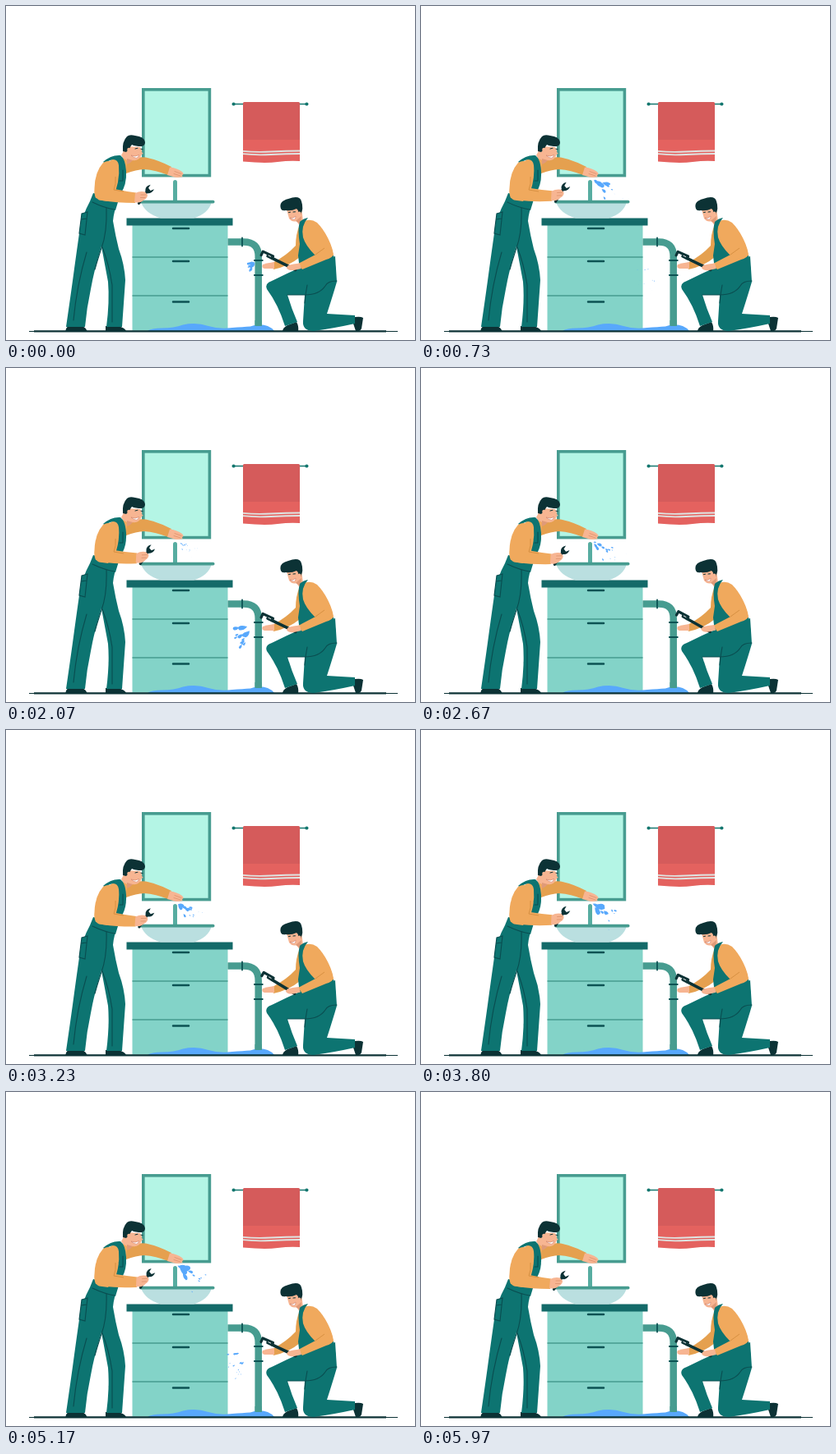
These frames come from a looping animation (497 px wide and 407 px high, 6.01 s). An HTML page:

```html
<!DOCTYPE html>
<html lang="en">
<head>
<meta charset="utf-8">
<title>Plumbers at work</title>
<style>
  html, body { margin: 0; width: 100%; height: 100%; overflow: hidden; background: #fff; }
  svg { display: block; width: 497px; height: 407px; }
  .suit { fill: #0d7471; }
  .shirt { fill: #f0a95d; }
  .shade { fill: #e5a04f; }
  .skin { fill: #f7b592; }
  .dark { fill: #0c3235; }
  .steel { fill: #479c90; }
  .water { fill: #58a8fc; }
  .seam { fill: none; stroke: #0a4d50; stroke-width: 1.1; stroke-linecap: round; }
  .ink { fill: none; stroke: #0c3235; stroke-linecap: round; stroke-linejoin: round; }
  .fold { fill: none; stroke: #d08a3c; stroke-width: .8; }
  .finger { fill: none; stroke: #d88c66; stroke-width: .7; stroke-linecap: round; }
  .smile { fill: #fff; stroke: #b85f4c; stroke-width: .4; }
</style>
</head>
<body>
<svg viewBox="0 0 497 407">
  <!-- mirror and towel -->
  <rect x="166.800" y="101.800" width="80.600" height="104.800" fill="#b4f5e5" stroke="#479c90" stroke-width="3.600"/>
  <path d="M277 119.500H365" stroke="#14776f" stroke-width="1.700"/>
  <g fill="#14776f"><circle cx="276.600" cy="119.500" r="2.100"/><circle cx="365.400" cy="119.500" r="2.100"/></g>
  <path d="M288 118.500Q288 117 289.500 117H355.500Q357 117 357 118.500V163H288Z" fill="#d55b5b"/>
  <path d="M288 163H357V189Q345 188 330 190T288 189.500Z" fill="#e4625f"/>
  <g fill="none" stroke="#dfe5e3" stroke-width="1.800">
    <path d="M288 176.800Q303 178.500 322 177.500T357 176.500"/><path d="M288 180.200Q303 182 322 181T357 180"/>
  </g>

  <!-- vanity -->
  <rect x="153.500" y="267" width="116" height="128.500" fill="#83d3c8"/>
  <path d="M153.500 306H269.500M153.500 353H269.500" stroke="#479c90" stroke-width="1.600"/>
  <path d="M203 271H222M203 311H222M203 360.500H222" class="ink" style="stroke:#0c5253" stroke-width="2.500"/>
  <rect x="146.500" y="258.500" width="129" height="9" fill="#146a69"/>
  <path d="M205.500 214.500V239" stroke="#57ada1" stroke-width="5" stroke-linecap="round"/>
  <path d="M164 239H250Q246 253 228 258.500H188Q169 253 164 239Z" fill="#badfe0"/>
  <rect x="162" y="236.800" width="91.500" height="3.700" rx="1.800" class="steel"/>

  <!-- pipe, puddle, floor -->
  <path d="M269.500 287.500H289Q306.700 287.500 306.700 305V391" fill="none" stroke="#479c90" stroke-width="8.500"/>
  <path d="M287 282.500V292.500M301.800 310H311.800M301.800 328H311.800" class="ink" style="stroke:#0c5253" stroke-width="1.800"/>
  <path class="water" d="M172 396Q176 392.500 190 392.500Q204 392.500 215 388.500Q231 385 246 390Q259 394 275 392Q288 391 297 390.500Q308 386.500 318 390Q323 392 326 396Z"/>
  <rect x="302.500" y="383" width="8.500" height="7" class="steel"/>
  <path d="M28 396H476V397H462V397.600H34V397H28ZM34 395.200H462V397H34Z" class="dark"/>

  <path id="tapWater" class="water"/>

  <!-- standing plumber -->
  <path class="shade" d="M146 189Q156 183 170 184.500Q186 188 201 196L197 206Q182 200 168 199Q158 199.500 146 204Z"/>
  <path class="skin" d="M199 196.500Q207 197 214 202Q217 205 214 206L214.500 208Q208 210 203 208L196 206Z"/>
  <path class="finger" d="M205 201.500L213 204.500M204 204.500L212 207"/>
  <path class="skin" d="M140 182L146 171L163 172Q167 178 164 183Q161 189 154 188L147 192Z"/>
  <path d="M147 186L154 188Q151 192 147 193Z" fill="#e09a78"/>
  <path class="dark" d="M142 177Q141 165 147 159Q150 156 157 158Q168 159 169 166Q169 170 165 171Q157 171 153 169Q151 171 150 174L146 178Z"/>
  <circle cx="149.500" cy="175" r="2.300" class="skin"/>
  <path d="M157 174L160 173.200M164 174.200L166 174.500" class="ink" stroke-width="1"/>
  <path d="M163 177L167 180L163 181" class="skin"/>
  <path class="smile" d="M152 182Q157 184.500 161.500 181.500Q160 188.500 152 182Z"/>

  <path class="dark" d="M72.500 397Q72 392 77 389H91Q98 392 98.500 397ZM121 397V390H136Q145 392 146.500 397Z"/>
  <path class="suit" d="M106 228L137 234Q131 250 130 262Q133 280 137 296Q144 315 145 334L141 391H122Q126 360 124 336L116 293Q107 322 103 345Q98 368 96 391H73Q79 350 83 320Q86 298 89 277Q92 256 102 238Z"/>
  <path class="shirt" d="M138 183L147 188Q147 206 140 220L134 240L109 234Q106 228 112 205Q120 189 138 183Z"/>
  <path class="suit" d="M118 190Q128 181 139 182Q145 186 146 201Q147 218 139 229L133 249L104 239L108 234L129 236Q139 214 137 194Q136 187 130 187Q124 188 121 192Z"/>
  <path class="seam" d="M105 239Q119 246 132 248M122 246Q123 276 116 295Q111 310 108 321M117 294Q125 314 129 340V385M82 383Q86 340 98 300M142 200V213H138"/>
  <path class="suit" d="M92 253L99 251L96 279L89 277Z"/>
  <path class="seam" d="M92 253L99 251L96 279L89 277ZM91 260L98 259"/>

  <g id="foreArm">
    <g transform="translate(166.500 233) rotate(34)">
      <path d="M0 9V-9" class="ink" stroke-width="3.200"/>
      <path transform="translate(0 -9) rotate(18)" d="M-3.500 -8Q-6.500 -2 -1.800 1.500H1.800Q6.500 -2 3.500 -8L2 -3.500H-2Z" class="dark"/>
    </g>
    <path class="shirt" d="M110 225L132 223Q146 226 158 227.500L157 240Q134 240 117 237Q108 236 109 228Z"/>
    <path class="skin" d="M157 228Q163 225 169 226.500L172 230Q172 234 168 236Q163 241 156 239Z"/>
    <path class="finger" d="M164 230H170M163.500 233.500H169"/>
  </g>
  <path class="shirt" d="M118 191Q126 186 132 193Q137 203 133 224L124 238L113 236.500Q106 233 107.500 222Q108 202 118 191Z"/>
  <path class="fold" d="M133 208Q134 217 131 224L143 226"/>

  <!-- kneeling plumber -->
  <path class="shade" d="M357 266Q352 278 352 292Q341 304 324 313L325 321Q344 317 357 306L366 285Z"/>
  <path class="skin" d="M326 312Q318 313 312 315Q310 319 314 320L326 320Z"/>
  <path class="skin" d="M341 248L359 246L361 262L357 268L353 262Q348 264 344 259Z"/>
  <path d="M352 262L359 256L358 266Z" fill="#e09a78"/>
  <path class="dark" d="M334 247Q331 238 343 235Q357 230 359 238Q362 247 358 254L355 253Q356 249 353 247Q347 250 340 249Q335 250 334 247Z"/>
  <circle cx="356.500" cy="252.500" r="2.100" class="skin"/>
  <path d="M343.500 251.600L345.500 251.200M349 251L351.500 250.800" class="ink" stroke-width="1"/>
  <path class="smile" d="M345 258.200Q349 259.500 352 256Q352 263 345 258.200Z"/>

  <path class="dark" d="M336 397Q336 392 342 389L353 385Q356 390 355 397ZM424 379Q431 378 434 380L432 393Q430 397 425 396L422 387Z"/>
  <path class="suit" d="M359 318L400 305L402 336Q398 350 390 375L424 377V387Q397 393 374 396Q360 396 361 384L363 352H342Q347 369 354 385L339 390Q331 364 317 345Q314 338 323 335Q341 326 359 318Z"/>
  <path class="shirt" d="M358 265Q368 257 378 264Q393 279 398 305L361 320L357 290Z"/>
  <path class="suit" d="M357 263Q361 259 367 258Q358 268 361 282Q364 292 375 303L398 304L401 322L357 322L355 304L357 290Q354 272 357 263Z"/>
  <path class="seam" d="M363 352Q381 352 388 341Q391 335 402 335M363 352H342M366 340Q364 350 363 362"/>

  <path id="pipeWater" class="water"/>
  <g id="wrench">
    <path d="M318 305.500L352 321.500" class="ink" stroke-width="3.600"/>
    <path d="M310 304.500L312 300L324.500 305.500L323 308" class="ink" stroke-width="3.200"/>
    <path d="M318.500 304.600L322 306.200" stroke="#fff" stroke-width=".9"/>
  </g>
  <path class="shirt" d="M368 261Q378 263 388 278Q396 290 398 303Q396 307 389 309L360 321L355 314L376 303Q364 289 362 277Q362 266 368 261Z"/>
  <path class="fold" d="M376 303L387 295"/>
  <path id="grip" class="skin" d="M357 313.500Q349 314 343 316L341 319Q344 323 350 322L359 320Z"/>
</svg>

<script>
const LOOP = 6010;
const CYCLE = LOOP / 4;
const $ = id => document.getElementById(id);
const fract = v => v - Math.floor(v);
const noise = n => fract(Math.sin(n * 12.9898) * 43758.5453);
const wave = (p, peak) => (1 + Math.cos((p - peak) * Math.PI * 2)) / 2;

// A drop starts at (x, y) and flies up to `far` within `fan` radians of `aim`.
// `lag` staggers the drops, `laps` is how often each one flies per burst.
const tap = { el: $('tapWater'), x: 209, y: 212, aim: .66, fan: .5, far: 44, size: 8.5, count: 20, lag: 1, laps: 3 };
const pipe = { el: $('pipeWater'), x: 303, y: 312, aim: 2.6, fan: .5, far: 52, size: 13, count: 14, lag: .3, laps: .7 };

// A pointed shape lying along its direction of travel.
function dropPath(x, y, len, angle) {
  const c = Math.cos(angle) * len, s = Math.sin(angle) * len;
  const p = (a, b) => `${(x + a * c - b * s).toFixed(2)} ${(y + a * s + b * c).toFixed(2)}`;
  return `M${p(-1, 0)}Q${p(-.1, -.85)} ${p(.8, -.45)}Q${p(1.2, 0)} ${p(.8, .4)}Q${p(.1, .65)} ${p(-1, 0)}Z`;
}

function burst(jet, phase, start, span, scale) {
  const u = fract(phase - start) / span;
  if (u >= 1) return '';
  const reach = jet.far * scale * Math.min(1, u * 10);
  const fade = Math.sqrt(1 - u) * scale;
  let d = '';
  for (let i = 1; i <= jet.count; i++) {
    const q = fract(noise(i) * jet.lag + u * jet.laps);
    const angle = jet.aim + (noise(i + 50) * 2 - 1) * jet.fan;
    const dist = reach * q * (.75 + noise(i + 90) * .35);
    const len = jet.size * (1 - q) ** 1.5 * Math.min(1, q * 6) * fade * (.6 + noise(i + 130) * .5);
    d += dropPath(jet.x + Math.cos(angle) * dist, jet.y + Math.sin(angle) * dist + 5 * q * q, len, angle);
  }
  return d;
}

function frame(now) {
  const phase = fract(now / CYCLE);
  const lift = wave(phase, .5);
  const turn = wave(phase * 2, .36);
  const slide = `translate(${-1.2 * turn} ${-.6 * turn})`;
  $('foreArm').setAttribute('transform', `translate(${1.8 * lift} 0) rotate(${-2.8 * lift} 113 233)`);
  $('wrench').setAttribute('transform', `${slide} rotate(${6.5 * turn} 350 320)`);
  $('grip').setAttribute('transform', slide);
  tap.el.setAttribute('d', burst(tap, phase, .385, .57, 1) + burst(tap, phase, .03, .37, .8));
  pipe.el.setAttribute('d', burst(pipe, phase, .27, .24, 1) + burst(pipe, phase, .975, .1, .45));
}

function tick() {
  frame(performance.now());
  requestAnimationFrame(tick);
}
tick();
</script>
</body>
</html>
```
